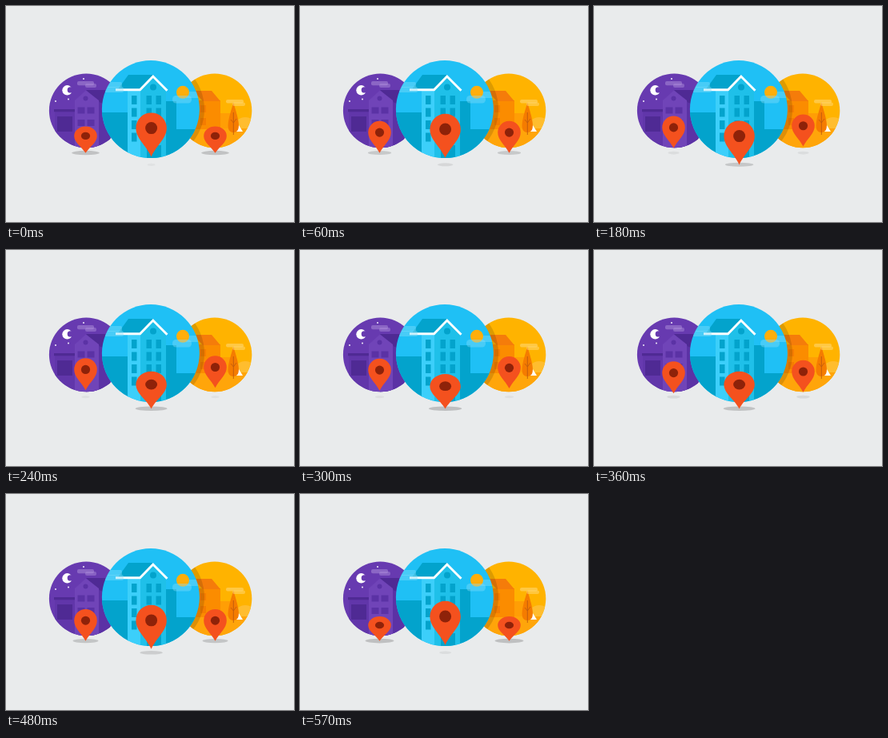
Write an HTML page with a canvas that moves like this. It is 360 px wide and 270 px high and loops after 0.66 s.

```html
<!DOCTYPE html>
<html lang="en">
<head>
<meta charset="utf-8">
<title>Bouncing map pins</title>
<style>
html, body { margin: 0; width: 100%; height: 100%; overflow: hidden; background: #e9ebec; }
canvas { display: block; width: 100vw; height: 100vh; }
</style>
</head>
<body>
<canvas id="stage"></canvas>
<script>
const W = 360, H = 270, LOOP = 660, STEP = 30, LAST = 570, CYCLE = 600;
const canvas = document.getElementById('stage');
const ratio = window.devicePixelRatio || 1;
canvas.width = W * ratio;
canvas.height = H * ratio;
const screen2d = canvas.getContext('2d');
const backdrop = document.createElement('canvas');
backdrop.width = canvas.width;
backdrop.height = canvas.height;
let c = backdrop.getContext('2d');
c.scale(ratio, ratio);
screen2d.scale(ratio, ratio);

function rect(color, x1, y1, x2, y2) {
  c.fillStyle = color;
  c.fillRect(x1, y1, x2 - x1, y2 - y1);
}
function path(p) {
  c.beginPath();
  for (let i = 0; i < p.length; i += 2) c.lineTo(p[i], p[i + 1]);
}
function poly(color, ...p) {
  c.fillStyle = color;
  path(p);
  c.fill();
}
function line(color, width, ...p) {
  c.strokeStyle = color;
  c.lineWidth = width;
  path(p);
  c.stroke();
}
function oval(color, x, y, rx, ry = rx) {
  c.fillStyle = color;
  c.beginPath();
  c.ellipse(x, y, rx, ry, 0, 0, Math.PI * 2);
  c.fill();
}
function pill(color, x1, y1, x2, y2, r = 2) {
  c.fillStyle = color;
  c.beginPath();
  c.roundRect(x1, y1, x2 - x1, y2 - y1, r);
  c.fill();
}
function disc(color, x, y, r, paint) {
  c.save();
  oval(color, x, y, r);
  c.clip();
  paint();
  c.restore();
}

function night() {
  const deep = '#4f2a94', mid = '#5b32a5';
  oval('#fff', 76.5, 105.3, 6.2);
  oval('#673ab0', 80.4, 104.9, 3.7);
  for (const [x, y] of [[97, 91], [62, 119], [78, 116.5]]) oval('#fff', x, y, 0.9);
  rect('#6136aa', 61, 132, 86, 178);
  rect(deep, 60, 129, 86, 132.3);
  rect(deep, 64, 138, 83, 157);
  rect(mid, 100, 105, 130, 178);
  poly(deep, 100, 105, 130, 105, 130, 123, 118, 121);
  poly('#7044b8', 86, 118, 100, 105.5, 116, 118, 116, 178, 86, 178);
  oval(mid, 99.5, 115.5, 3);
  for (const y of [126.5, 142])
    for (const x of [89.5, 101.5]) rect(mid, x, y, x + 9, y + 8);
  pill('rgba(175,145,220,.5)', 89, 94, 110, 99.2);
  pill('rgba(175,145,220,.45)', 99, 97, 113, 102);
}

function sunset() {
  oval('#ffbd2e', 299, 153, 14);
  rect('#ffa50a', 225, 153, 310, 180);
  rect('#ff9e05', 253, 134, 282, 153);
  rect('#fb8c00', 232, 118, 268, 154);
  poly('#f57c0a', 234, 106, 257, 106, 268, 119, 246, 119);
  for (const y of [124, 140]) rect('#f57c00', 243, y, 250, y + 9);
  poly('#fff', 285, 157, 291, 149, 296, 157);
  c.fillStyle = '#f57c00';
  c.beginPath();
  c.moveTo(284.3, 120);
  c.bezierCurveTo(287, 132, 298, 158, 284.3, 158);
  c.bezierCurveTo(270.6, 158, 281.6, 132, 284.3, 120);
  c.fill();
  line('#bd5a10', 0.9, 284.3, 133, 284.3, 161);
  line('#bd5a10', 0.8, 281, 142, 284.3, 146, 288, 141);
  pill('rgba(255,225,150,.45)', 275, 117, 297, 121.5);
  pill('rgba(255,225,150,.4)', 283, 120.5, 299, 125);
}

function day() {
  const deep = '#03a3cc';
  rect(deep, 118, 133, 153, 192);
  rect(deep, 199, 119, 213, 192);
  rect(deep, 213, 154, 244, 192);
  rect('#3ccffa', 152, 105, 169, 192);
  poly('#1fc0e9', 168, 105, 184, 89, 200, 105, 200, 192, 168, 192);
  poly(deep, 140, 104, 153, 86, 184, 86, 167, 104);
  line('#fff', 2.9, 137, 104.8, 167.5, 104.8, 183.8, 88, 201.5, 105.8);
  oval(deep, 184, 101.5, 4);
  for (let y = 112; y < 170; y += 15.5)
    for (const x of [157, 175.5, 187.5]) rect(deep, x, y, x + 6.5, y + 11);
  rect(deep, 176, 174, 194, 192);
  const mist = 'rgba(130,220,248,.42)';
  pill(mist, 126, 95, 145, 102);
  pill(mist, 117, 101, 147, 108);
  pill(mist, 221, 107, 246, 115);
  oval('#ffae0a', 221, 107.8, 8);
  pill(mist, 208, 112, 232, 121.5, 4.5);
}

function scene() {
  rect('#e9ebec', 0, 0, W, H);
  const shade = () => oval('rgba(70,45,0,.18)', 183, 129, 65);
  disc('#673ab0', 100.3, 130.8, 46.4, night);
  disc('#ffb300', 260.9, 130.8, 46.4, () => { sunset(); shade(); });
  disc('#1fc0f5', 180.9, 129.1, 61, day);
}

// high: tip at the top of the hop, drop: length of the hop, speed: fall per unit of swing,
// press: swing at which squashing starts, low: time of the deepest squash
const side = { r: 14.3, full: 40, squash: 9.5, press: 0.84, low: 558, spread: 13, grow: 1, ground: 183.6 };
const pins = [
  { ...side, x: 99.5, high: 175, drop: 8.8, speed: 16.5 },
  { ...side, x: 261.5, high: 172, drop: 11.8, speed: 22 },
  { x: 181.6, r: 19.2, full: 55, squash: 11.7, press: 0.655, low: 300, spread: 15.7,
    grow: 0.5, ground: 198.3, high: 188.4, drop: 10, speed: 15.3 }
];

const swing = (p, t) => (1 + Math.cos((t - p.low) / CYCLE * Math.PI * 2)) / 2;

function shadow(p, t) {
  const k = swing(p, t) ** p.grow;
  oval(`rgba(30,30,30,${0.04 + 0.17 * k})`, p.x, p.ground, 5 + p.spread * k, 1.6 + 1.2 * k);
}

function pin(p, t) {
  const s = swing(p, t), { r, full } = p, cy = r - full;
  const tip = p.high + Math.min(p.drop, p.speed * s);
  const press = Math.max(0, (s - p.press) / (1 - p.press));
  c.save();
  c.translate(p.x, tip);
  c.scale(1, 1 - press * p.squash / full);
  c.fillStyle = '#f4511e';
  c.beginPath();
  c.arc(0, cy, r, Math.PI, 0);
  c.bezierCurveTo(r, cy + r * 0.68, r * 0.36, cy + r * 1.1, 0, 0);
  c.bezierCurveTo(-r * 0.36, cy + r * 1.1, -r, cy + r * 0.68, -r, cy);
  c.fill();
  oval('#8e2209', 0, cy, r * 0.39);
  c.restore();
}

scene();
c = screen2d;

function draw(now) {
  const t = Math.min(LAST, Math.floor((now % LOOP) / STEP) * STEP);
  c.drawImage(backdrop, 0, 0, W, H);
  for (const p of pins) shadow(p, t);
  for (const p of pins) pin(p, t);
}

let start;
function tick(now) {
  start ??= now;
  draw(now - start);
  requestAnimationFrame(tick);
}
draw(0);
requestAnimationFrame(tick);
</script>
</body>
</html>
```
